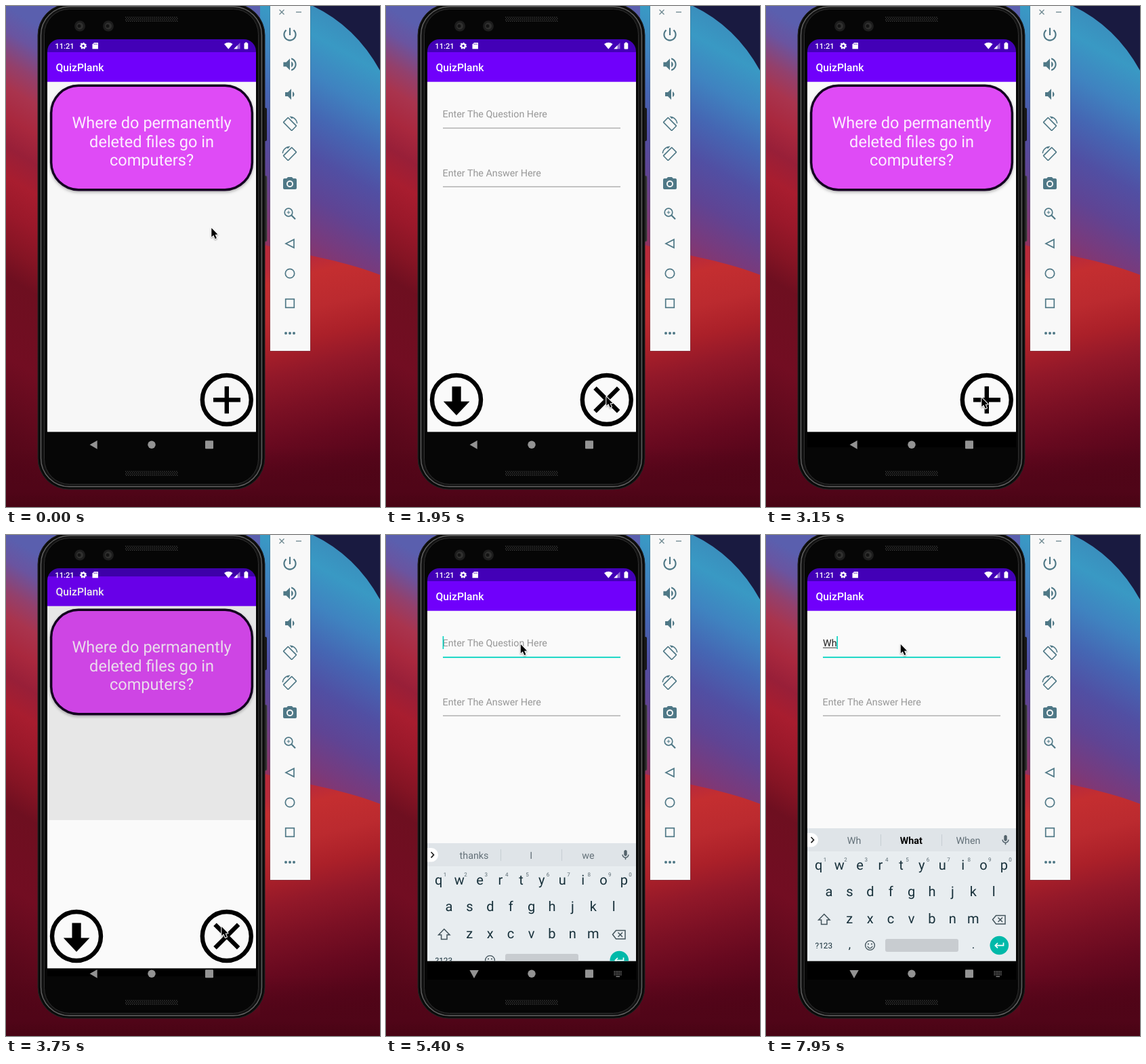
Write an HTML page with a canvas that moves like this. It is 552 px wide and 738 px high and loops after 8 s.

```html
<!DOCTYPE html>
<html lang="en">
<head>
<meta charset="utf-8">
<title>QuizPlank</title>
<style>
html, body { margin: 0; width: 100%; height: 100%; overflow: hidden; background: #4a0516; }
canvas { display: block; width: 552px; height: 738px; }
</style>
</head>
<body>
<canvas id="stage" width="552" height="738"></canvas>
<script>
const c = document.getElementById('stage').getContext('2d');
c.textRendering = 'geometricPrecision';
const LOOP = 8000, STEP = 150;
const BODY = '#060606', SLATE = '#4f7886', TEAL = '#03d3c0', KEY = '#17303a';

// ---- helpers ----
function rect(x, y, w, h, fill) { c.fillStyle = fill; c.fillRect(x, y, w, h); }

function round(x, y, w, h, r, fill, stroke, lw) {
  c.beginPath();
  c.roundRect(x, y, w, h, r);
  paint(fill, stroke, lw);
}

function paint(fill, stroke, lw) {
  if (fill) { c.fillStyle = fill; c.fill(); }
  if (stroke) { c.strokeStyle = stroke; c.lineWidth = lw || 1; c.stroke(); }
}

function disc(x, y, r, fill, stroke, lw) {
  c.beginPath();
  c.arc(x, y, r, 0, 7);
  paint(fill, stroke, lw);
}

function poly(pts, fill, stroke, lw, open) {
  c.beginPath();
  pts.forEach(([x, y], i) => i ? c.lineTo(x, y) : c.moveTo(x, y));
  if (!open) c.closePath();
  paint(fill, stroke, lw);
}

const line = (x1, y1, x2, y2, color, lw) => poly([[x1, y1], [x2, y2]], null, color, lw, true);

function text(s, x, y, size, color, align = 'left', weight = 400) {
  c.font = `${weight} ${size}px Roboto, "Noto Sans", sans-serif`;
  c.textAlign = align;
  c.fillStyle = color;
  c.fillText(s, x, y);
}

// Material glyph on a 24 unit grid, centred on x, y
function glyph(d, x, y, scale, color, flip = 1) {
  c.save();
  c.translate(x, y);
  c.scale(scale * flip, scale);
  c.translate(-12, -12);
  c.fillStyle = color;
  c.fill(new Path2D(d), 'evenodd');
  c.restore();
}

// Gradient whose contours run at the given slope
function slant(x, y, h, slope, stops) {
  const len = h / (1 + slope * slope);
  const g = c.createLinearGradient(x, y, x - slope * len, y + len);
  stops.forEach(([p, color]) => g.addColorStop(p, color));
  return g;
}

// ---- desktop ----
function wallpaper() {
  rect(0, 0, 552, 738, slant(0, 0, 738, .6, [
    [0, '#5a5fae'], [.05, '#6a54a0'], [.11, '#93406c'], [.16, '#a9344e'], [.22, '#a9283e'],
    [.28, '#981f38'], [.34, '#a81d2f'], [.41, '#9a182a'], [.48, '#851424'], [.54, '#6e0f20'],
    [.7, '#720d22'], [.85, '#5a081b'], [1, '#4a0414']]));
  rect(375, 0, 177, 738, slant(449, 0, 400, .55, [
    [0, '#3a8fbd'], [.1, '#3999c4'], [.25, '#3f83c0'], [.4, '#4566b3'], [.55, '#514fa3'],
    [.7, '#5f4494'], [.85, '#793a7c'], [1, '#96305c']]));

  c.beginPath();
  c.moveTo(453, 0);
  c.quadraticCurveTo(516, 30, 552, 95);
  c.lineTo(552, 0);
  paint('#191a40');

  c.beginPath();
  c.moveTo(375, 350);
  c.bezierCurveTo(430, 366, 490, 372, 552, 396);
  c.lineTo(552, 738);
  c.lineTo(375, 738);
  paint(slant(449, 372, 366, -.25, [
    [0, '#b92a3a'], [.06, '#c42e30'], [.2, '#bb2a2f'], [.32, '#ab2029'], [.44, '#921829'],
    [.58, '#7b1024'], [.72, '#67091f'], [.86, '#56051a'], [1, '#4a0414']]));

  rect(0, 650, 552, 88, slant(0, 650, 88, 0, [[0, 'rgba(80,5,24,0)'], [.75, '#500518'], [1, '#480414']]));
}

function grille(y) {
  for (let i = 0; i < 26; i++)
    for (let j = 0; j < 4; j++) rect(176 + i * 3 + (j % 2), y + j * 2, 1.5, 1, '#424242');
}

function phone() {
  round(380, 150, 5, 49, 2, '#161616');
  round(380, 250, 5, 97, 2, '#2a2a2a', '#4c4c4c', .8);
  round(47, -3, 335, 715, 46, '#0b0b0b', '#242424', 1);
  round(51.5, 1, 326, 707, 42, '#121212', '#626262', 1.4);
  round(56.5, 4.5, 316, 700, 37, BODY, '#303030', 1);
  grille(16);
  grille(685);
  for (const x of [109, 151]) {
    disc(x, 29.5, 8, '#1d1d1d');
    disc(x, 29.5, 5, '#30302f');
    disc(x - 1, 29.5, 2.5, '#131313');
  }
}

const POWER = 'M13 3h-2v10h2V3zm4.83 2.17l-1.42 1.42C17.99 7.86 19 9.81 19 12c0 3.87-3.13 7-7 7s-7-3.13-7-7c0-2.19 1.01-4.14 2.58-5.42L6.17 5.17C4.23 6.82 3 9.26 3 12c0 4.97 4.03 9 9 9s9-4.03 9-9c0-2.74-1.23-5.18-3.17-6.83z';
const LOUD = 'M3 9v6h4l5 5V4L7 9H3zm13.5 3c0-1.77-1.02-3.29-2.5-4.03v8.05c1.48-.73 2.5-2.25 2.5-4.02zM14 3.23v2.06c2.89.86 5 3.54 5 6.71s-2.11 5.85-5 6.71v2.06c4.01-.91 7-4.49 7-8.77s-2.99-7.86-7-8.77z';
const QUIET = 'M18.5 12c0-1.77-1.02-3.29-2.5-4.03v8.05c1.48-.73 2.5-2.25 2.5-4.02zM5 9v6h4l5 5V4L9 9H5z';
const ROTATE = 'M16.5 2.5c3.3 1.6 5.6 4.7 6 8.5h1.5C23.4 4.8 18.3 0 12 0l-.7 0 3.8 3.8 1.4-1.3zM10.2 1.75c-.6-.6-1.5-.6-2.1 0L1.75 8.1c-.6.6-.6 1.5 0 2.1l12 12c.6.6 1.5.6 2.1 0l6.4-6.4c.6-.6.6-1.5 0-2.1L10.2 1.75zm4.6 19.1L3.15 9.17l6-6 11.7 11.7-6.05 6z';
const CAMERA = 'M9 2L7.2 4H4c-1.1 0-2 .9-2 2v12c0 1.1.9 2 2 2h16c1.1 0 2-.9 2-2V6c0-1.1-.9-2-2-2h-3.2L15 2H9zm3 15c-2.76 0-5-2.24-5-5s2.24-5 5-5 5 2.24 5 5-2.24 5-5 5z';
const MIC = 'M12 14c1.66 0 3-1.34 3-3V5c0-1.66-1.34-3-3-3S9 3.34 9 5v6c0 1.66 1.34 3 3 3zm5-3c0 2.76-2.24 5-5 5s-5-2.24-5-5H5c0 3.53 2.61 6.43 6 6.92V21h2v-3.08c3.39-.49 6-3.39 6-6.92h-2z';

function panel() {
  rect(389.5, 0, 60, 508.5, 'rgba(70,90,100,.55)');
  rect(390, 0, 59, 508, '#f8f8f8');
  line(403.5, 5.5, 410.5, 12.5, '#6b868f', 1.2);
  line(410.5, 5.5, 403.5, 12.5, '#6b868f', 1.2);
  line(428, 9, 436, 9, '#6b868f', 1.3);
  glyph(POWER, 419, 42, 1.07, SLATE);
  glyph(LOUD, 419, 86, 1.07, SLATE);
  glyph(QUIET, 419, 130, 1.0, SLATE);
  glyph(ROTATE, 419, 174, .95, SLATE);
  glyph(ROTATE, 419, 218, .95, SLATE, -1);
  glyph(CAMERA, 419, 262, 1, SLATE);
  disc(419, 262, 3.1, SLATE);
  disc(417, 304, 5.8, null, SLATE, 1.7);
  line(421.3, 308.3, 427, 314, SLATE, 2.2);
  line(414.5, 304, 419.5, 304, SLATE, 1);
  line(417, 301.5, 417, 306.5, SLATE, 1);
  poly([[413, 350], [425, 344], [425, 356]], null, SLATE, 1.7);
  disc(419, 394, 6.7, null, SLATE, 1.7);
  c.strokeRect(412.7, 431.7, 12.6, 12.6);
  for (const x of [413, 419, 425]) disc(x, 482, 2, SLATE);
}

// ---- app ----
function appBar(bg, nav) {
  rect(61, 49, 308, 19, '#4300b7');
  rect(61, 68, 308, 44, '#7000fb');
  text('QuizPlank', 73.5, 96, 15.7, '#fff', 'left', 500);
  rect(61, 111.7, 308, 516, bg);
  rect(61, 627.5, 308, 60, nav);
}

function ring(x) { disc(x, 580, 36, null, '#000', 6.4); }

function cardScreen(bg, nav) {
  appBar(bg, nav);
  c.save();
  c.shadowColor = 'rgba(0,0,0,.3)';
  c.shadowBlur = 4;
  c.shadowOffsetY = 2;
  round(64.9, 115.6, 300.2, 156.8, 42, '#140022');
  c.restore();
  round(68.4, 119.1, 293.2, 149.8, 38.5, '#df4bf6');
  ['Where do permanently', 'deleted files go in', 'computers?'].forEach((s, i) =>
    text(s, 215, 180 + i * 27.6, 23.55, '#fdeeff', 'center'));
  ring(325.8);
  rect(306, 577, 40, 6.4, '#000');
  rect(322.6, 560.3, 6.4, 40, '#000');
}

function formScreen(nav, s) {
  appBar('#fafafa', nav);
  const hint = '#979797';
  if (s.typed) {
    text(s.typed, 84, 164, 14.3, '#1f1f1f');
    const w = c.measureText(s.typed).width;
    rect(84, 165.6, w, 1, '#333');
    if (s.caret) rect(83.8 + w, 149, 1.6, 19, TEAL);
  } else {
    text('Enter The Question Here', 83.5, 164, 14.3, hint);
    if (s.caret) rect(83.6, 149, 1.6, 19, TEAL);
  }
  text('Enter The Answer Here', 83.5, 250.5, 14.3, hint);
  if (s.focus) rect(84, 179.3, 262, 1.8, TEAL);
  else rect(84, 179.4, 262, 1, '#8f8f8f');
  rect(84, 265.7, 262, 1, '#8f8f8f');

  ring(104);
  rect(97.5, 560.5, 13.2, 23, '#000');
  poly([[84.8, 582.5], [123.4, 582.5], [104, 603]], '#000');
  ring(325.8);
  line(308.5, 562.7, 343.1, 597.3, '#000', 6.3);
  line(343.1, 562.7, 308.5, 597.3, '#000', 6.3);
}

function keyRow(keys, x, y) {
  [...keys].forEach((k, i) => text(k, x + i * 30.4, y, 20, KEY, 'center'));
}

function keyboard(dy, words, bold) {
  c.save();
  c.beginPath();
  c.rect(61, 400, 308, 227.5);
  c.clip();
  c.translate(0, dy);
  rect(61, 432, 308, 196, '#e8edf0');
  rect(61, 432, 308, 34, '#dfe4e8');
  round(50, 439, 27, 20.5, 10, '#fff');
  poly([[66.5, 445], [70.5, 449.2], [66.5, 453.4]], null, '#222', 1.7, true);
  rect(169, 441, 1, 17, '#c6cdd2');
  rect(259, 441, 1, 17, '#c6cdd2');
  words.forEach((w, i) => {
    const strong = bold && i === 1;
    text(w, 130 + i * 84.2, 455, 14.3, strong ? '#000' : '#637078', 'center', strong ? 700 : 400);
  });
  glyph(MIC, 353.5, 449.5, .74, '#52616a');

  keyRow('qwertyuiop', 77.8, 493);
  for (let i = 0; i < 10; i++) text((i + 1) % 10, 87 + i * 30.4, 480.5, 8, '#5a6a72', 'center');
  keyRow('asdfghjkl', 93, 532);
  keyRow('zxcvbnm', 123.3, 572);
  poly([[85.8, 558.5], [94, 567], [90, 567], [90, 573.5], [81.6, 573.5], [81.6, 567], [77.6, 567]], null, '#43545c', 1.5);
  poly([[334.5, 566.5], [339.5, 560.5], [353, 560.5], [353, 573], [339.5, 573]], null, '#43545c', 1.5);
  line(342.5, 563.5, 349, 570, '#43545c', 1.5);
  line(349, 563.5, 342.5, 570, '#43545c', 1.5);

  text('?123', 85.3, 609, 11.8, KEY, 'center');
  text(',', 123.3, 609, 17, KEY, 'center');
  text('.', 306, 609, 17, KEY, 'center');
  disc(153.5, 604.5, 6.9, null, '#43545c', 1.4);
  disc(151, 602.5, 1.1, '#43545c');
  disc(156, 602.5, 1.1, '#43545c');
  c.beginPath();
  c.arc(153.5, 605, 3.6, .2, 2.94);
  paint(null, '#43545c', 1.3);
  round(176, 595, 108, 19, 3, '#c8ccd0');
  disc(344.3, 604.5, 13.8, '#00b9a9');
  poly([[350.5, 600.5], [350.5, 604.7], [338.5, 604.7]], null, '#fff', 1.7, true);
  poly([[342, 601], [338.3, 604.7], [342, 608.4]], null, '#fff', 1.7, true);
  c.restore();
}

function statusIcons() {
  text('11:21', 72.3, 62.8, 11.2, '#fff', 'left', 500);
  c.setLineDash([1.9, 1.9]);
  disc(114, 58.7, 4.2, null, '#fff', 1.7);
  c.setLineDash([]);
  disc(114, 58.7, 2.8, null, '#fff', 2.2);
  poly([[130, 54], [136, 54], [136, 63.3], [127.5, 63.3], [127.5, 56.5]], '#fff');
  for (const x of [130, 132, 134]) rect(x - .3, 55.2, .8, 2, '#4300b7');
  c.beginPath();
  c.moveTo(328.3, 63.4);
  c.lineTo(322, 56);
  c.quadraticCurveTo(328.3, 51.6, 334.6, 56);
  paint('#fff');
  poly([[345.5, 54], [345.5, 63.3], [336.3, 63.3]], 'rgba(255,255,255,.4)');
  poly([[341.5, 58], [341.5, 63.3], [336.3, 63.3]], '#fff');
  round(351.5, 54.5, 5.8, 9, 1, '#fff');
  rect(353.2, 53.4, 2.4, 1.5, '#fff');
}

function navIcons(open) {
  const gray = '#939393';
  poly(open ? [[123.4, 641], [136.8, 641], [130, 653]] : [[123.6, 646.3], [134.7, 640], [134.7, 652.7]], gray);
  disc(215, 646.3, 5.7, gray);
  round(294, 640.3, 12, 12, 1, gray);
  if (!open) return;
  for (let j = 0; j < 3; j++)
    for (let i = 0; i < 5; i++) rect(336.5 + i * 2.4, 642.3 + j * 2.4, 1.4, 1.4, '#8a8a8a');
  rect(339.5, 649.8, 5.5, 1.3, '#8a8a8a');
}

function pointer(x, y) {
  c.save();
  c.shadowColor = 'rgba(0,0,0,.35)';
  c.shadowBlur = 2;
  c.shadowOffsetY = 1;
  c.lineJoin = 'round';
  const shape = [[.8, 1], [.8, 14.3], [3.8, 11.5], [6.2, 17], [8.4, 16], [6.1, 10.7], [10, 10.5]].map(([a, b]) => [x + a, y + b]);
  poly(shape, null, '#fff', 2);
  c.restore();
  poly(shape, '#000');
}

// ---- timeline: [time, x, y], held until the next entry ----
const PATH = [
  [0, 302.5, 326], [450, 298, 345], [600, 290.5, 400], [750, 299, 470], [900, 318, 540],
  [1050, 330, 570], [1200, 324.5, 574.5], [2550, 320, 574], [2700, 311, 573], [2850, 306, 573],
  [3000, 312, 574.5], [3150, 317.5, 576], [4200, 304, 535], [4350, 268, 395], [4500, 220, 220],
  [4650, 198, 153], [4800, 198, 157], [4950, 198, 160]];

// How far the form covers the card screen, and where its upper edge is
function cover(t) {
  if (t < 1950) return [0, 0];
  if (t < 2100) return [1, 0];
  if (t < 2250) return [.63, 554];
  if (t < 2400) return [.06, 626];
  if (t < 3750) return [0, 0];
  if (t < 3900) return [.58, 420];
  if (t < 4050) return [.95, 70];
  return [1, 0];
}

const BLINK = [5100, 5700, 6150, 6900, 7200, 7650, 7800];

function render(t) {
  const [k, edge] = cover(t);
  const open = t >= 5250;
  const nav = t < 2250 ? BODY : '#000';
  const form = {
    focus: t >= 5100,
    caret: BLINK.filter(b => t >= b).length % 2 === 1,
    typed: t >= 7950 ? 'Wh' : t >= 7800 ? 'W' : ''
  };
  wallpaper();
  phone();
  panel();

  c.save();
  c.beginPath();
  c.roundRect(61, 49, 308, open ? 606 : 601, [18, 18, 0, 0]);
  c.clip();
  if (k < 1) {
    c.save();
    c.translate(0, -Math.round(12.4 * k));
    cardScreen(t < 1950 ? '#f7f7f7' : '#fafafa', nav);
    c.restore();
    rect(61, 49, 308, 578, `rgba(0,0,0,${.13 * k})`);
  }
  if (k > 0) {
    c.beginPath();
    c.rect(61, edge, 308, 738);
    c.clip();
    c.translate(0, Math.round(26 * (1 - k)));
    formScreen(nav, form);
  }
  c.restore();

  if (open) {
    const dy = t < 5400 ? 120 : t < 5550 ? 22 : 0;
    const words = form.typed === 'Wh' ? ['Wh', 'What', 'When'] : form.typed ? ['W', 'We', 'With'] : ['thanks', 'I', 'we'];
    keyboard(dy, words, form.typed);
  }
  statusIcons();
  navIcons(open);
  const [, x, y] = PATH.filter(p => t >= p[0]).pop();
  pointer(x, y);
}

let last = -1;
function tick(now) {
  const t = Math.floor(now % LOOP / STEP) * STEP;
  if (t !== last) render(last = t);
  requestAnimationFrame(tick);
}
render(0);
requestAnimationFrame(tick);
</script>
</body>
</html>
```
